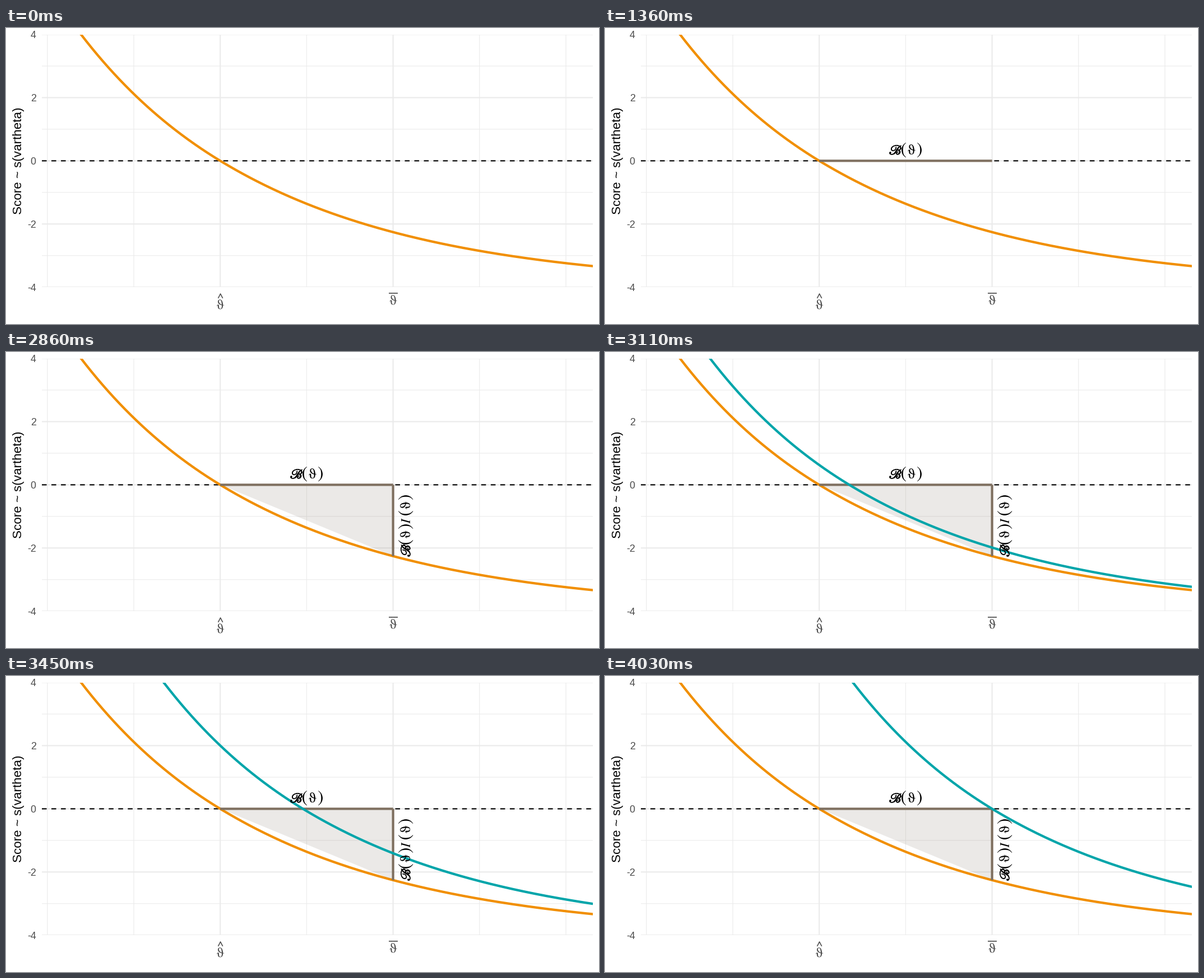
Animation of 1058x529 px, one loop 9900 ms. Source, as a matplotlib script:

```python
import numpy as np
import matplotlib.pyplot as plt
from matplotlib.animation import FuncAnimation
from matplotlib.patches import PathPatch, Polygon
from matplotlib.textpath import TextPath
from matplotlib.transforms import Affine2D

W, H, DPI = 1058, 529, 64
LOOP_MS, TICK = 9900, 30
STEP = 48.6                     # ms between changes of the picture
FADE_STEPS, SHIFT_STEPS = 17, 23

LEFT, RIGHT, TOP, BOTTOM = 64, 1047, 11.5, 463.2
ZERO_Y, UNIT_Y = 237.35, 56.46
HAT_X, BAR_X = 382.2, 690.6
SPAN = BAR_X - HAT_X

ORANGE, TEAL, BROWN = "#F18F00", "#00A5AA", "#7F7060"
GRID, GREY = "#EBEBEB", "#4D4D4D"


def pt(px):
    return px * 72 / DPI


def to_y(value):
    return ZERO_Y - UNIT_Y * value


def score(u):
    """Decaying score, zero at u = 0 and tending to -4."""
    return 4 * (np.exp(-0.831 * u + 0.037 * np.minimum(u, 0) ** 2) - 1)


fig = plt.figure(figsize=(W / DPI, H / DPI), dpi=DPI, facecolor="white")


def pixel_axes(x0, x1, y0, y1):
    ax = fig.add_axes([x0 / W, 1 - y1 / H, (x1 - x0) / W, (y1 - y0) / H])
    ax.set_xlim(x0, x1)
    ax.set_ylim(y1, y0)
    ax.axis("off")
    return ax


panel = pixel_axes(LEFT, RIGHT, TOP, BOTTOM)
page = pixel_axes(0, W, 0, H)


def line(ax, xs, ys, color, px, z, **kw):
    return ax.plot(xs, ys, color=color, lw=pt(px), zorder=z, snap=False,
                   scalex=False, scaley=False, solid_capstyle="butt", **kw)[0]


def glyph(tex, center, size, frame, color="black", weight=0.0):
    """Math symbol with its ink centred at `center` along the baseline."""
    path = TextPath((0, 0), f"${tex}$", size=size,
                    prop={"math_fontfamily": "stix"})
    box = path.get_extents()
    move = Affine2D().translate(center - (box.x0 + box.x1) / 2, 0)
    patch = PathPatch(path.transformed(move + frame), facecolor=color,
                      edgecolor=color, lw=pt(weight), zorder=5)
    return page.add_patch(patch)


def across(x, y):
    return Affine2D([[1, 0, x], [0, -1, y], [0, 0, 1]])


def upward(x, y):
    return Affine2D([[0, -1, x], [-1, 0, y], [0, 0, 1]])


def theta_in_parens(start, frame):
    return [glyph("(", start, 31, frame),
            glyph(r"\mathrm{\vartheta}", start + 14, 26, frame),
            glyph(")", start + 28, 31, frame)]


def bias(frame):
    script = glyph(r"\mathscr{B}", 9, 24, frame, weight=1.0)
    return [script] + theta_in_parens(24, frame)


# Grid
for k in range(-2, 5):
    x = HAT_X + k * SPAN / 2
    major = k in (0, 2)
    line(panel, [x, x], [TOP, BOTTOM], GRID, 2.2 if major else 1.1, major)
for v in range(-4, 5):
    major = v % 2 == 0
    line(panel, [LEFT, RIGHT], [to_y(v)] * 2, GRID, 2.2 if major else 1.1, major)
line(panel, [LEFT, RIGHT], [ZERO_Y] * 2, "black", 2.13, 2,
     dashes=(4, 4), dash_capstyle="butt")

# Axis text
for v in range(-4, 5, 2):
    page.text(53.6, to_y(v) + 6.4, str(v), ha="right", va="baseline",
              family="Liberation Sans", fontsize=pt(17.9), color=GREY)
page.text(28, ZERO_Y, "Score ~ s(vartheta)", rotation=90,
          rotation_mode="anchor", ha="center", va="baseline",
          family="Liberation Sans", fontsize=pt(22.4), color="black")
glyph(r"\mathrm{\vartheta}", 0, 25, across(382.5, 502.5), GREY)
glyph(r"\mathrm{\vartheta}", 0, 25, across(691, 494.5), GREY)
line(page, [378.5, 382.6, 386.7], [483, 475, 483], GREY, 1.6, 5)
line(page, [683, 699], [474, 474], GREY, 1.7, 5)

# Curves
xs = np.linspace(LEFT, RIGHT + 4, 400)
line(panel, xs, to_y(score((xs - HAT_X) / SPAN)), ORANGE, 4.3, 3)
teal = line(panel, [], [], TEAL, 4.3, 6)

# Triangle with its two labelled sides
corner_y = to_y(score(1.0))
triangle = Polygon([(HAT_X, ZERO_Y), (BAR_X, ZERO_Y), (BAR_X, corner_y)],
                   facecolor=BROWN, alpha=0.15, lw=0, zorder=4)
panel.add_patch(triangle)

run = [line(panel, [HAT_X, BAR_X], [ZERO_Y] * 2, BROWN, 4.2, 5)]
run += bias(across(509, 226))

side = upward(721, 364)
rise = [line(panel, [BAR_X, BAR_X], [ZERO_Y, corner_y], BROWN, 4.2, 5)]
rise += bias(side) + [glyph("I", 62, 24, side)] + theta_in_parens(76, side)


def steps_since(t, start):
    return int(np.floor((t - start) / STEP))


def fade(group, t, start):
    alpha = np.clip((steps_since(t, start) + 1) / FADE_STEPS, 0, 1)
    for artist in group:
        artist.set_alpha(alpha)
        artist.set_visible(alpha > 0)


def update(i):
    t = (i + 0.5) * TICK
    fade(run, t, 580)
    fade(rise, t, 1750)
    moved = steps_since(t, 2860) - 1
    triangle.set_visible(moved >= -1)
    teal.set_visible(moved >= 0)
    shift = np.clip(moved / SHIFT_STEPS, 0, 1)
    teal.set_data(xs, to_y(score((xs - HAT_X) / SPAN - shift)))
    return [*run, *rise, triangle, teal]


def reset():
    return update(0)


anim = FuncAnimation(fig, update, frames=LOOP_MS // TICK, init_func=reset,
                     interval=TICK, repeat=True, repeat_delay=0)
plt.show()
```
